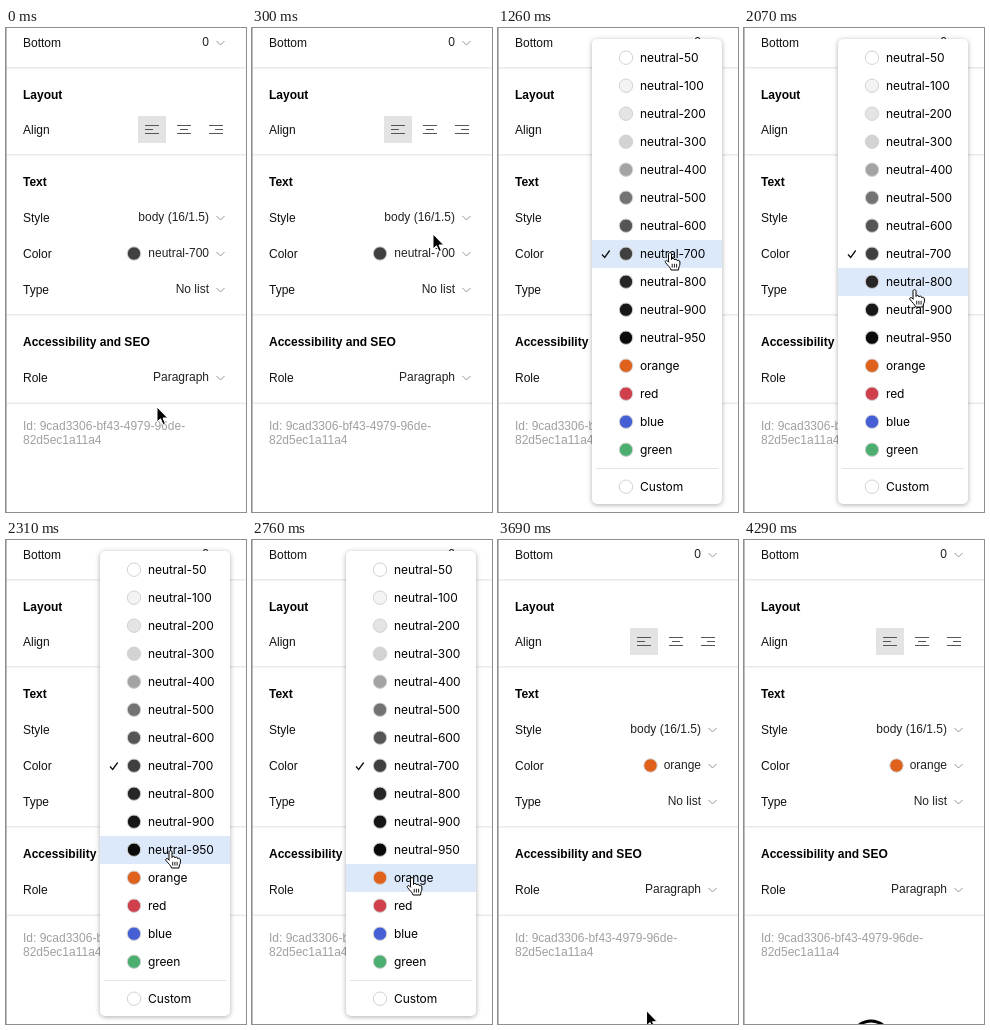
These frames come from a looping animation (240 px wide and 484 px high, 4320 ms). An HTML page:

```html
<!DOCTYPE html>
<html lang="en">
<head>
<meta charset="utf-8">
<title>Colour menu</title>
<style>
html, body { margin: 0; width: 100%; height: 100%; overflow: hidden; background: #fff; }
svg { display: block; width: 240px; height: 484px; }
text { font: 12px "Liberation Sans", Arial, sans-serif; fill: #111; }
.head { font-weight: bold; fill: #000; }
.value { text-anchor: end; fill: #222; }
.id { fill: #a0a0a0; }
.menu text { font: 12px Inter, sans-serif; letter-spacing: -.1px; fill: #000; }
.rule { fill: #ebebeb; }
.line { fill: none; stroke: #969696; stroke-width: 1; }
.icon { fill: none; stroke: #555; stroke-width: 1.2; }
.hover { fill: none; stroke: #e4e4e4; }
.dot { stroke: #d2d2d2; stroke-width: 1; }
.sheet { fill: #fff; filter: drop-shadow(0 1px 2.5px rgba(0,0,0,.32)); }
</style>
</head>
<body>
<svg id="stage" viewBox="0 0 240 484">
  <g id="panel">
    <rect width="1" height="484" fill="#bcbcbc"/>
    <rect x="132" y="88" width="28" height="27" fill="#e3e3e3"/>
    <path class="icon" d="M139 97.5h14m-14 4h8m-8 4h14M171 97.5h14m-11 4h8m-11 4h14M203 97.5h14m-8 4h8m-14 4h14"/>
    <rect id="colorHover" class="hover" x="114.5" y="211.5" width="110" height="29" rx="2"/>
    <rect id="roleHover" class="hover" x="140.5" y="335.5" width="84" height="28" rx="2"/>
  </g>
  <g id="menu" class="menu">
    <rect class="sheet" x="94" y="11" width="130" height="465" rx="5"/>
    <rect id="pick" x="94" width="130" height="28" fill="#dce9fa"/>
    <rect x="98" y="440" width="122" height="1" fill="#e3e3e3"/>
    <path d="M104 226.5l2.7 3 5-7" fill="none" stroke="#111" stroke-width="1.3"/>
  </g>
  <path id="arrow" d="M0 0V15L3.5 11.8 6 17.6 8.4 16.5 6 11H10.7Z" stroke="#fff" stroke-width="1"/>
  <g id="hand" stroke="#000" stroke-linejoin="round" stroke-linecap="round">
    <path fill="#fff" d="M-1.5 8V1.2C-1.5-.9 1.5-.9 1.5 1.2V6.5C1.9 4.8 4.5 5 4.5 7 5.1 5.6 7.3 5.9 7.3 7.8 8.1 6.8 9.9 7.3 9.9 9V11C9.9 13 8.5 14 8.5 17H1C.5 14.5-2 12.8-4.5 9.5-5.5 7.8-3.3 7-2.5 8L-1.5 9Z"/>
    <path fill="none" stroke-width=".9" d="M2.2 11.2v3M4.4 11.2v3M6.6 11.2v3"/>
  </g>
  <circle id="ring" fill="none" stroke="#000" stroke-width="3"/>
</svg>
<script>
const LOOP = 4320, STEP = 30;
const $ = id => document.getElementById(id);
const [panel, menu, pick, arrow, hand, ring, colorHover, roleHover] =
  ['panel', 'menu', 'pick', 'arrow', 'hand', 'ring', 'colorHover', 'roleHover'].map($);

function add(parent, tag, attrs, text = '') {
  const el = document.createElementNS('http://www.w3.org/2000/svg', tag);
  for (const k in attrs) el.setAttribute(k, attrs[k]);
  el.textContent = text;
  return parent.appendChild(el);
}
const write = (x, y, text, cls = '') => add(panel, 'text', { x, y, class: cls }, text);
const dot = (parent, cx, cy, r, fill) => add(parent, 'circle', { cx, cy, r, fill, class: 'dot' });
const show = (el, on) => { el.style.visibility = on ? 'visible' : 'hidden'; };

// Panel
for (const y of [39, 126, 286, 374.5])
  add(panel, 'rect', { x: 1, y, width: 239, height: 1.6, class: 'rule' });
for (const [y, text] of [[71, 'Layout'], [158, 'Text'], [318, 'Accessibility and SEO']])
  write(17, y, text, 'head');
const rows = [[19, 'Bottom', '0'], [194, 'Style', 'body (16/1.5)'],
  [230, 'Color', 'neutral-700'], [266, 'Type', 'No list'], [354, 'Role', 'Paragraph']];
const values = {};
for (const [y, label, value] of rows) {
  write(17, y, label);
  values[label] = write(203, y - 1, value, 'value');
  add(panel, 'path', { class: 'line', d: `M210.5 ${y - 6}l4 4 4-4` });
}
write(17, 106, 'Align');
write(17, 402, 'Id: 9cad3306-bf43-4979-96de-', 'id');
write(17, 416, '82d5ec1a11a4', 'id');
const swatch = dot(panel, 128, 225.5, 6.7, '#404040');

// Menu
const colors = {
  'neutral-50': '#fff', 'neutral-100': '#f3f3f3', 'neutral-200': '#e4e4e4',
  'neutral-300': '#d3d3d3', 'neutral-400': '#a3a3a3', 'neutral-500': '#737373',
  'neutral-600': '#555', 'neutral-700': '#404040', 'neutral-800': '#262626',
  'neutral-900': '#171717', 'neutral-950': '#0a0a0a',
  orange: '#e0611c', red: '#d03f4c', blue: '#465fd4', green: '#4caf70', Custom: '#fff'
};
Object.entries(colors).forEach(([name, fill], i) => {
  const y = name === 'Custom' ? 459 : 30 + i * 28;
  dot(menu, 128, y - .3, 6.7, fill);
  add(menu, 'text', { x: 142, y: y + 4 }, name);
});

// Pointer path: time, x, y
const track = [
  [0, 151, 379], [90, 147, 360], [180, 157, 300], [300, 181, 206], [420, 173, 222],
  [570, 173, 222], [600, 172, 225], [1200, 172, 225], [1230, 171, 225], [1260, 172, 225],
  [1950, 172, 225], [2070, 170.5, 262], [2190, 167, 292], [2310, 164.5, 311],
  [2490, 164.5, 311], [2610, 160, 338], [3330, 160, 338], [3360, 160, 339],
  [3420, 160, 339], [3750, 146, 500], [4290, 127, 500.5]
];
function pointer(t) {
  const i = track.findIndex(p => p[0] >= t);
  if (i < 1) return track[0].slice(1);
  const [t0, x0, y0] = track[i - 1], [t1, x1, y1] = track[i];
  const k = (t - t0) / (t1 - t0);
  return [x0 + (x1 - x0) * k, y0 + (y1 - y0) * k];
}

// Click ring: radius and opacity per step
const clicks = [750, 2790, 4290];
const pulse = [[19.5, 1], [29, 1], [34, .5]];

function draw(t) {
  const [x, y] = pointer(t);
  const isHand = t >= 600 && t < 2880;
  for (const el of [arrow, hand]) el.setAttribute('transform', `translate(${x} ${y})`);
  show(hand, isHand);
  show(arrow, !isHand);

  const open = t >= 840 && t < 2910;
  show(colorHover, t >= 570 && t < 840);
  show(roleHover, t >= 3360 && y < 364);
  menu.style.display = open ? '' : 'none';
  menu.style.opacity = t >= 2880 ? .5 : 1;
  pick.setAttribute('y', 16 + 28 * Math.round((y - 30) / 28));
  pick.style.opacity = t === 2850 ? 0 : 1;

  const name = t >= 2880 ? 'orange' : 'neutral-700';
  values.Color.textContent = name;
  swatch.setAttribute('cx', name === 'orange' ? 152.5 : 128);
  swatch.setAttribute('fill', colors[name]);

  const start = clicks.find(c => t >= c && t < c + STEP * pulse.length);
  show(ring, start !== undefined);
  if (start !== undefined) {
    const [r, opacity] = pulse[(t - start) / STEP];
    for (const [k, v] of Object.entries({ cx: x, cy: y, r, opacity })) ring.setAttribute(k, v);
  }
}

const begin = performance.now();
function tick() {
  const t = (performance.now() - begin) % LOOP;
  draw(Math.floor(t / STEP) * STEP);
  requestAnimationFrame(tick);
}
tick();
</script>
</body>
</html>
```
